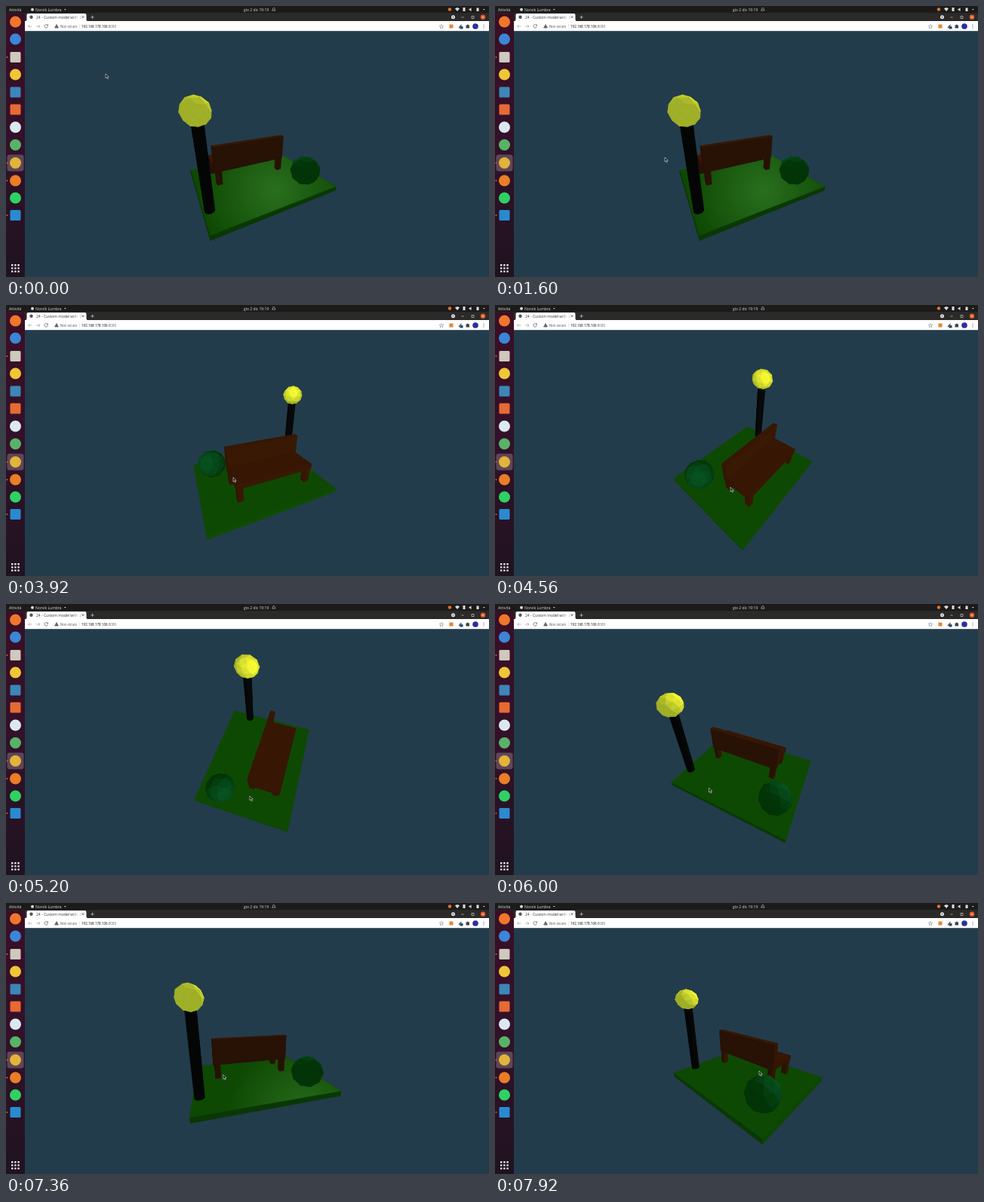
Recreate the animation shown at these times as an HTML page with a canvas. Size 640x360 px, loop 8000 ms.

```html
<!DOCTYPE html>
<html lang="it">
<head>
<meta charset="utf-8">
<title>Park bench</title>
<style>
  html, body { margin: 0; width: 100%; height: 100%; overflow: hidden; background: #233c4b; }
  canvas, svg { position: absolute; left: 0; top: 0; width: 640px; height: 360px; }
  text { font: 5px "Open Sans", "Noto Sans", sans-serif; }
  .web { font: 4.6px Roboto, Arial, sans-serif; }
</style>
</head>
<body>
<canvas id="view" width="640" height="360"></canvas>
<svg viewBox="0 0 640 360">
  <defs>
    <linearGradient id="dockFill" x2="0" y2="1">
      <stop offset="0" stop-color="#3a0f25"/><stop offset=".5" stop-color="#32112a"/><stop offset="1" stop-color="#1f1320"/>
    </linearGradient>
    <linearGradient id="fade"><stop offset="0" stop-color="#fff" stop-opacity="0"/><stop offset="1" stop-color="#fff"/></linearGradient>
  </defs>

  <!-- system bar -->
  <rect width="640" height="9.5" fill="#1c1b1a"/>
  <g fill="#ddd">
    <text x="4" y="6.5">Attività</text>
    <circle cx="35" cy="4.7" r="2" fill="#d9d9d9"/>
    <text x="39" y="6.5">Norvik Lumbra</text>
    <path d="M77 4l1.3 1.5L79.6 4z"/>
    <text x="315" y="6.5">gio 2 dic  19:19</text>
    <path d="M352.5 6q1-.8 1-2.2a1.300 1.300 0 0 1 2.600 0q0 1.400 1 2.200z" fill="none" stroke="#bbb" stroke-width=".7"/>
    <circle cx="588" cy="4.5" r="2.2" fill="#e8722a"/>
    <path d="M595 3.5q3-2.5 6 0L598 7z"/>
    <rect x="605.500" y="2" width="3" height="5"/>
    <path d="M613.5 3.800h1.200l1.800-1.600v5l-1.800-1.600h-1.200z"/>
    <rect x="623.5" y="2.5" width="3" height="4.5"/>
    <path d="M632 4l1.300 1.500L634.600 4z"/>
  </g>

  <!-- tabs -->
  <rect x="25" y="9.5" width="615" height="11" fill="#2b2a28"/>
  <path d="M26 20q1.500 0 1.500-2v-6q0-2 2-2h75q2 0 2 2v6q0 2 1.500 2z" fill="#fff"/>
  <circle cx="33.5" cy="14.8" r="2.2" fill="#555"/>
  <text x="40" y="16.6" fill="#333">24 - Custom model with c</text>
  <rect x="88" y="11" width="10" height="8" fill="url(#fade)"/>
  <path d="M100.500 13.200l3 3m0-3l-3 3" stroke="#555" stroke-width=".8"/>
  <path d="M112.300 14.800h4.400m-2.200-2.200v4.400M603.500 15h3M617 13.500h3v3h-3z" stroke="#ccc" stroke-width=".7" fill="none"/>
  <circle cx="592.5" cy="14.8" r="2.5" fill="#e6e6e6"/><circle cx="592.5" cy="14.8" r=".8" fill="#333"/>
  <circle cx="632" cy="14.8" r="3.2" fill="#e4592b"/>
  <path d="M631 13.800l2 2m0-2l-2 2" stroke="#fff" stroke-width=".6"/>

  <!-- toolbar -->
  <rect x="25" y="20" width="615" height="13.2" fill="#fff"/>
  <g fill="none" stroke="#666" stroke-width=".8">
    <path d="M34.500 27h-5m2-2l-2 2 2 2M40 27h5m-2-2l2 2-2 2" stroke="#aaa"/>
    <path d="M55.300 25.700a2.300 2.300 0 1 0 .2 1.800m0-3v1.600h-1.700"/>
    <path d="M67 24.500l2.400 4.500h-4.800z" fill="#666"/>
    <path d="M97.500 24.500v5" stroke="#ccc" stroke-width=".5"/>
    <path d="M577 24.500l.8 1.700 1.900.2-1.400 1.300.4 1.900-1.700-1-1.700 1 .4-1.900-1.400-1.300 1.900-.2z" stroke-width=".5"/>
    <path d="M600 29l3.500-4" stroke="#355" stroke-width="1.2"/>
  </g>
  <text class="web" x="72" y="28.6" fill="#666">Non sicuro</text>
  <text class="web" x="100" y="28.6" fill="#222">192.168.178.106<tspan fill="#777">:8080</tspan></text>
  <rect x="587.5" y="24.5" width="5" height="5" fill="#e8852c"/>
  <rect x="601.5" y="27" width="4" height="3.5" fill="#2b4a60"/>
  <path d="M609.500 25.500h1.200a1 1 0 0 1 2 0h1.300v4h-4.500z" fill="#444"/>
  <circle cx="622" cy="27" r="3.8" fill="#2b2fa0"/>
  <g fill="#555"><circle cx="633" cy="25" r=".6"/><circle cx="633" cy="27" r=".6"/><circle cx="633" cy="29" r=".6"/></g>

  <!-- dock -->
  <rect y="9.5" width="25" height="351" fill="url(#dockFill)"/>
  <rect x="1.5" y="197.5" width="22" height="22" rx="3" fill="#5f4658"/>
  <g id="dock"></g>
  <path id="cursor" d="M0 0v5.800l1.400-1.200 1 2.200 1-.5-1-2.100h1.800z" fill="#111" stroke="#e8e8e8" stroke-width=".6"/>
</svg>
<script>
const ctx = view.getContext('2d');
const { sin, cos, PI, max, hypot } = Math;
const RAD = PI / 180, FOCAL = 213, CX = 332.5, CY = 196.5;
const dot = (a, b) => a[0] * b[0] + a[1] * b[1] + a[2] * b[2];
const sub = (a, b) => a.map((v, i) => v - b[i]);
const mid = pts => [0, 1, 2].map(i => pts.reduce((s, p) => s + p[i], 0) / pts.length);
const unit = a => { const l = hypot(...a); return a.map(v => v / l); };
const cross = (a, b) => [a[1] * b[2] - a[2] * b[1], a[2] * b[0] - a[0] * b[2], a[0] * b[1] - a[1] * b[0]];

// ---- dock icons: y, shape, colour, running
[[21, 'c', '#f0762b'], [44, 'c', '#3b86d6'], [68, 's', '#cfc8bd', 1], [91, 'c', '#efc637'],
 [114.5, 's', '#3c86b8'], [137.5, 's', '#e66a33'], [161, 'c', '#dce8f0'], [184.5, 'c', '#58b368'],
 [208.5, 'c', '#e2b43a', 1], [232, 'c', '#ea7d26', 1], [255, 'c', '#2fd163'], [278, 's', '#2a8ad0', 1]]
  .forEach(([y, kind, fill, on]) => {
    dock.innerHTML += (kind == 'c' ? `<circle cx="12.5" cy="${y}" r="7.5" fill="${fill}"/>`
      : `<rect x="5.5" y="${y - 7}" width="14" height="14" rx="1.5" fill="${fill}"/>`) +
      (on ? `<circle cx="1.5" cy="${y}" r="1" fill="#e4592b"/>` : '');
  });
for (let i = 0; i < 9; i++)
  dock.innerHTML += `<rect x="${7 + i % 3 * 4.2}" y="${343 + (i / 3 | 0) * 4.2}" width="2.4" height="2.4" rx=".6" fill="#eee"/>`;

// ---- convex solids
function solid(faces, dark, lit, shine) {
  const center = mid(faces.flat());
  return { dark, lit, shine, center, faces: faces.map(pts => {
    let n = unit(cross(sub(pts[1], pts[0]), sub(pts[2], pts[0])));
    if (dot(n, sub(pts[0], center)) < 0) n = n.map(v => -v);
    return { pts, n };
  }) };
}
function box(x0, x1, y0, y1, z0, z1, ...colors) {
  const lo = [x0, y0, z0], hi = [x1, y1, z1], faces = [];
  for (let a = 0; a < 3; a++) for (const end of [lo, hi])
    faces.push([[0, 0], [1, 0], [1, 1], [0, 1]].map(([u, v]) => {
      const p = [];
      p[a] = end[a];
      p[(a + 1) % 3] = (u ? hi : lo)[(a + 1) % 3];
      p[(a + 2) % 3] = (v ? hi : lo)[(a + 2) % 3];
      return p;
    }));
  return solid(faces, ...colors);
}
function post(x, z, r, y0, y1, ...colors) {
  const ring = y => Array.from({ length: 14 }, (_, i) => [x + r * cos(i * PI / 7), y, z + r * sin(i * PI / 7)]);
  const a = ring(y0), b = ring(y1);
  return solid([b, ...a.map((p, i) => [p, a[(i + 1) % 14], b[(i + 1) % 14], b[i]])], ...colors);
}
function ball(at, radii, ...colors) {
  const v = [[0, 1, 0], [0, -1, 0]], tris = [];
  for (let i = 0; i < 10; i++) v.push([.8944 * cos(i * PI / 5), i % 2 ? -.4472 : .4472, .8944 * sin(i * PI / 5)]);
  const near = (a, b) => hypot(...sub(a, b)) < 1.1;
  v.forEach((a, i) => v.forEach((b, j) => v.forEach((c, k) => {
    if (i < j && j < k && near(a, b) && near(b, c) && near(a, c)) {
      const ab = unit(mid([a, b])), bc = unit(mid([b, c])), ca = unit(mid([c, a]));
      tris.push([a, ab, ca], [b, ab, bc], [c, bc, ca], [ab, bc, ca]);
    }
  })));
  return solid(tris.map(t => t.map(p => p.map((q, i) => at[i] + q * radii[i]))), ...colors);
}

const GROUND = -.172, LAMP = [-.166, .3, -.345], WOOD = [[40, 17, 5], [66, 27, 4]];
const board = box(-.311, .311, GROUND - .028, GROUND, -.377, .377, [9, 56, 6], [18, 86, 0], '70,150,60');
const bush = ball([-.16, -.104, .26], [.09, .09, .09], [3, 52, 8], [8, 82, 34]);
const pole = post(LAMP[0], LAMP[2], .0235, GROUND, .247, [5, 6, 6], [10, 12, 10]);
const bulb = ball(LAMP, [.07, .058, .058], [160, 176, 40], [252, 254, 50]);
const back = box(.01, .037, -.07, .085, -.265, .2, ...WOOD);
const seat = box(.037, .2, -.068, -.035, -.265, .2, ...WOOD, '190,105,85');
const legs = [.01, .168].flatMap(x => [-.258, .165].map(z => box(x, x + .03, -.157, -.068, z, z + .03, ...WOOD)));
const LIGHT = [sin(55 * RAD) * cos(35 * RAD), sin(35 * RAD), cos(55 * RAD) * cos(35 * RAD)];

// ---- camera and drawing
let cam, right, up, sheen;
function aim(az, el) {
  const s = sin(az * RAD), c = cos(az * RAD), se = sin(el * RAD), ce = cos(el * RAD);
  cam = [s * ce, se, c * ce];
  right = [c, 0, -s];
  up = [-s * se, ce, -c * se];
  sheen = max(0, -cos((az - 55) * RAD)) ** 2;
}
function project(p) {
  const k = FOCAL / (1 - dot(cam, p));
  return [CX + k * dot(right, p), CY - k * dot(up, p)];
}
const dist = p => hypot(...sub(cam, p));

// glow around the point where a level surface mirrors the light into the camera
function glare(y, color) {
  const k = (cam[1] - y) / LIGHT[1];
  const [gx, gy] = project([cam[0] + k * LIGHT[0], y, cam[2] + k * LIGHT[2]]);
  const g = ctx.createRadialGradient(gx, gy, 0, gx, gy, 100);
  g.addColorStop(0, `rgba(${color},${.5 * sheen})`);
  g.addColorStop(1, `rgba(${color},0)`);
  return g;
}
function draw({ faces, dark, lit, shine }) {
  for (const { pts, n } of faces) {
    if (dot(n, sub(cam, pts[0])) <= 0) continue;
    const k = max(0, dot(n, LIGHT));
    ctx.fillStyle = ctx.strokeStyle = `rgb(${dark.map((d, i) => d + (lit[i] - d) * k)})`;
    ctx.beginPath();
    pts.forEach(p => ctx.lineTo(...project(p)));
    ctx.closePath();
    ctx.fill();
    ctx.stroke();
    if (shine && n[1] > .9 && sheen > .05) {
      ctx.fillStyle = glare(pts[0][1], shine);
      ctx.fill();
    }
  }
}
const farFirst = (a, b) => dist(b.center) - dist(a.center);
const items = [
  { center: bush.center, parts: () => [bush] },
  { center: [LAMP[0], 0, LAMP[2]], parts: () => cam[1] < .247 ? [bulb, pole] : [pole, bulb] },
  { center: [.08, -.05, -.03], parts: () => [...legs.sort(farFirst), ...(cam[0] > .037 ? [back, seat] : [seat, back])] }
];

// ---- motion: [time, values...]
const orbit = [[1760, -117.5, 22.5], [2640, -224.5, 25.5], [3920, -294, 28], [5200, -342.7, 66], [6880, -514, 10], [7920, -407, 21]];
const mouse = [[880, 132, 90], [1600, 225, 201], [1760, 225, 201], [2640, 327, 231], [3920, 301, 229], [5200, 323, 255], [6880, 238, 232], [7920, 350, 223]];
function at(keys, t) {
  const i = keys.findIndex(k => k[0] > t);
  if (i < 1) return keys[i ? keys.length - 1 : 0].slice(1);
  const a = keys[i - 1], b = keys[i], u = (t - a[0]) / (b[0] - a[0]), e = u * u * (3 - 2 * u);
  return a.slice(1).map((v, j) => v + (b[j + 1] - v) * e);
}

function frame(now) {
  const t = now % 8000;
  aim(...at(orbit, t));
  ctx.fillStyle = '#233c4b';
  ctx.fillRect(0, 0, 640, 360);
  ctx.lineWidth = .8;
  ctx.lineJoin = 'round';
  draw(board);
  items.sort(farFirst).forEach(item => item.parts().forEach(draw));
  cursor.setAttribute('transform', `translate(${at(mouse, t)})`);
  requestAnimationFrame(frame);
}
requestAnimationFrame(frame);
</script>
</body>
</html>
```
